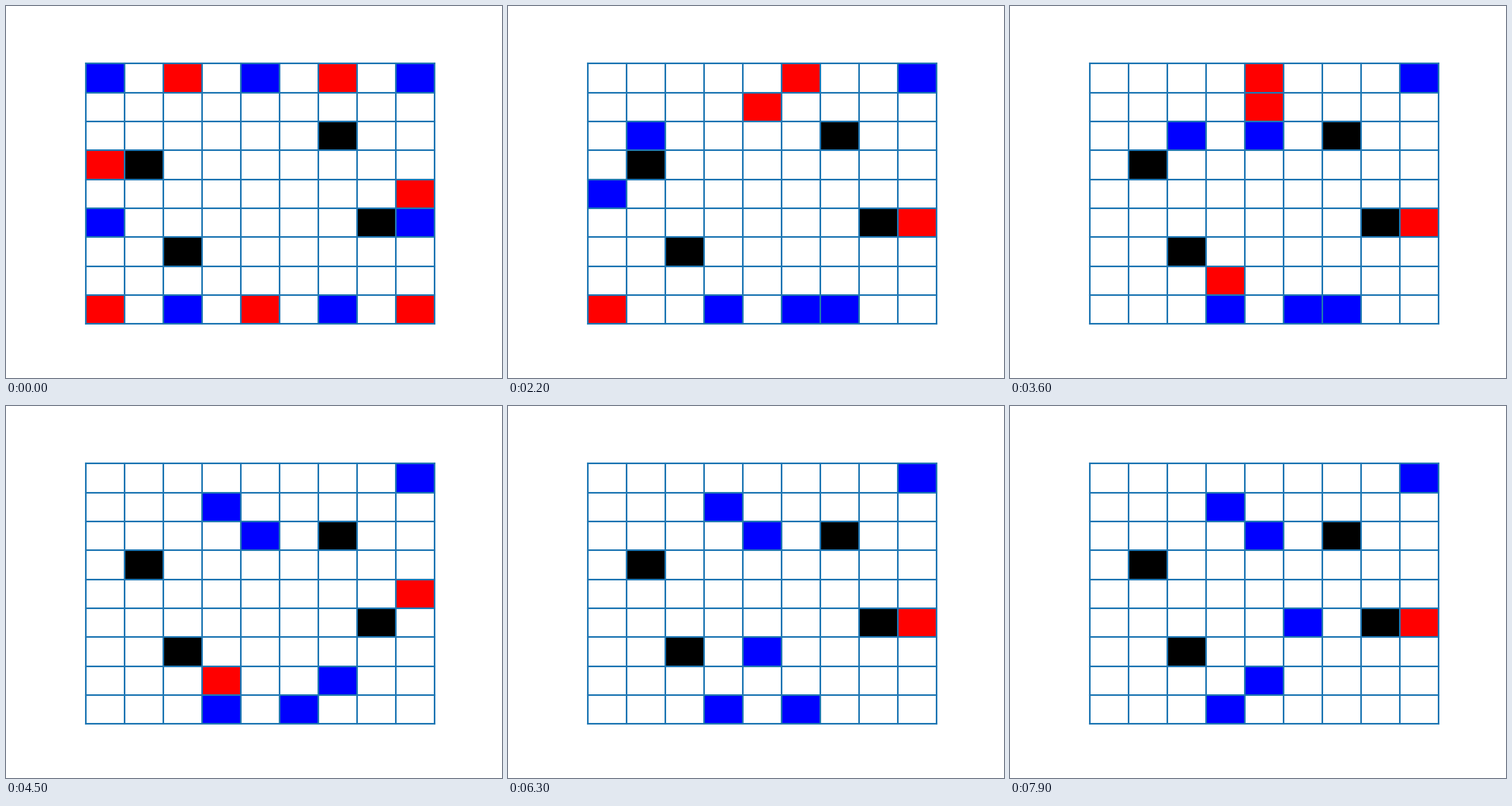
A matplotlib script that plays this animation: 640 by 480 pixels, repeating every 8 s.

```python
import matplotlib.pyplot as plt
from matplotlib.animation import FuncAnimation
from matplotlib.patches import Rectangle

SIZE = 9
STEPS = 80
DIRS = {"L": (-1, 0), "R": (1, 0), "U": (0, -1), "D": (0, 1)}

WALLS = [(6, 2), (1, 3), (7, 5), (2, 6)]
BLUE = [(0, 0), (4, 0), (8, 0), (0, 5), (8, 5), (2, 8), (6, 8)]
RED = [(2, 0), (6, 0), (0, 3), (8, 4), (0, 8), (4, 8), (8, 8)]

# Each move is column, row, direction; blue and red take turns.
BLUE_MOVES = """
28R 68L 85D 86D 05U 87L 77D 78L 00D 01D 02R 12R 22R 32R 04R 14R 24U 23U
22U 21R 68U 67R 77L 67L 57L 47U 46D 47U 46D 47U 46D 47U
46D 58U 57U 47U 46D 56U 47U 46D
""".split()
RED_MOVES = """
88L 78L 84D 85U 20R 60L 84D 85U 84D 30R 40D 08U 07R 50L 17R 27R 37U 36D
85U 40D 84D 85U 84U 83D 84D 85U 84D 85U 84D 85U 84D
85U 84U 83D 84D 85U 84D 85U 84D
""".split()


def move(board, step):
    x, y, way = step
    x, y = int(x), int(y)
    dx, dy = DIRS[way]
    board[x + dx, y + dy] = board.pop((x, y))


def capture(board):
    """Remove every piece that touches two enemies."""
    def enemies(cell):
        x, y = cell
        near = (board.get((x + dx, y + dy)) for dx, dy in DIRS.values())
        return sum(c not in (None, board[cell]) for c in near)

    for cell in [c for c in board if enemies(c) >= 2]:
        del board[cell]


def play():
    board = {**dict.fromkeys(BLUE, "blue"), **dict.fromkeys(RED, "red")}
    states = [dict(board)]
    for n in range(STEPS - 1):
        turn = RED_MOVES if n % 2 else BLUE_MOVES
        move(board, turn[n // 2])
        capture(board)
        states.append(dict(board))
    return states


states = play()

fig, ax = plt.subplots(figsize=(6.4, 4.8), dpi=100)
ax.axis("off")
for k in range(SIZE + 1):
    ax.plot([0, SIZE], [k, k], color="C0")
    ax.plot([k, k], [0, SIZE], color="C0")

cells = {}
for x in range(SIZE):
    for y in range(SIZE):
        color = "black" if (x, y) in WALLS else "white"
        cells[x, y] = ax.add_patch(Rectangle((x, y), 1, 1, fc=color, lw=0))

margin = 0.05 * SIZE
ax.set_xlim(-margin, SIZE + margin)
ax.set_ylim(SIZE + margin, -margin)


def draw(n):
    for pos, cell in cells.items():
        if pos not in WALLS:
            cell.set_facecolor(states[n].get(pos, "white"))
    return list(cells.values())


anim = FuncAnimation(fig, draw, frames=STEPS, interval=100, repeat=True,
                     repeat_delay=0)
plt.show()
```
